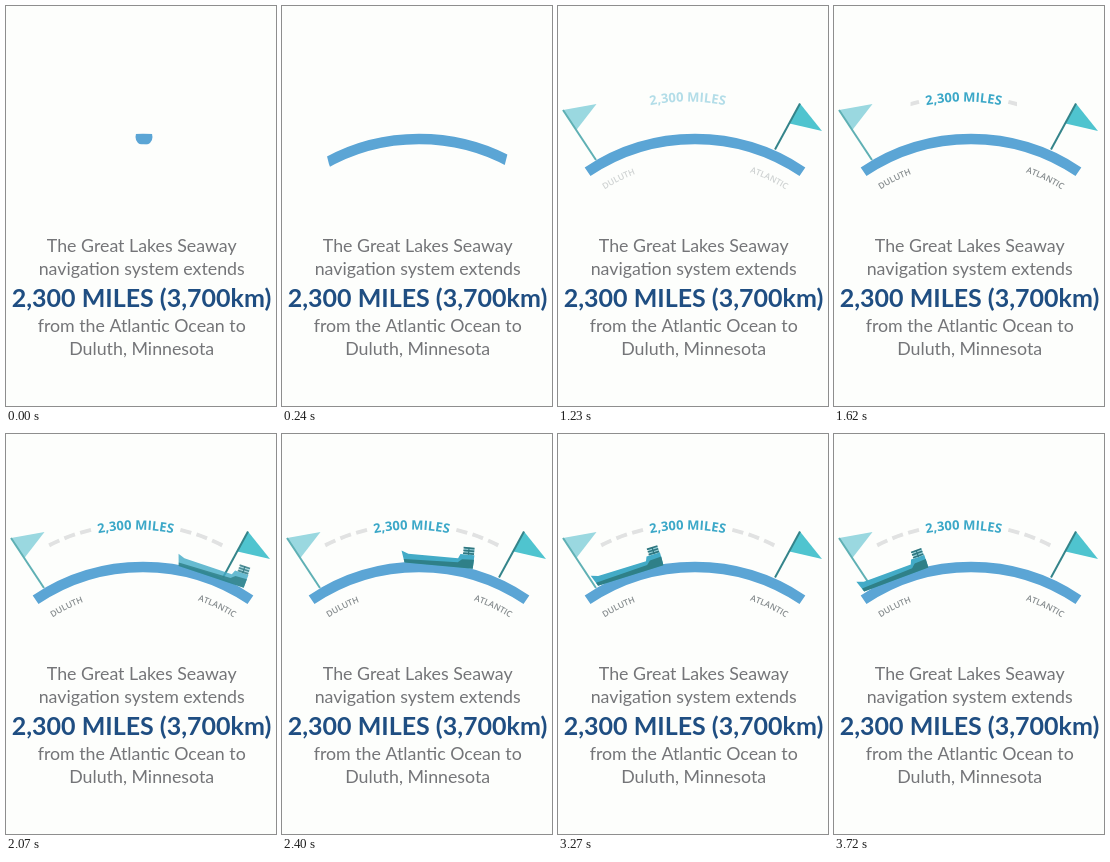
These frames come from a looping animation (270 by 400 pixels, 3750 ms). An HTML page with a canvas:

```html
<!DOCTYPE html>
<html lang="en">
<head>
<meta charset="utf-8">
<title>Seaway</title>
<style>
html, body { margin: 0; width: 100%; height: 100%; overflow: hidden; background: #fdfefc; }
canvas { display: block; width: 270px; height: 400px; }
</style>
</head>
<body>
<canvas id="stage"></canvas>
<script>
const LOOP = 3750, STEP = 30;
const W = 270, H = 400;
const canvas = document.getElementById('stage');
const ctx = canvas.getContext('2d');
const dpr = window.devicePixelRatio || 1;
canvas.width = W * dpr;
canvas.height = H * dpr;

const RAD = Math.PI / 180;
const river = { x: 137, y: 325.6, r: 192.6 };
const route = { x: 129.7, y: 280.5, r: 190 };

const progress = (t, start, length) => Math.min(1, Math.max(0, (t - start) / length));
const easeOut = (p, power) => 1 - Math.pow(1 - p, power);

function polygon(color, points) {
  ctx.fillStyle = color;
  ctx.beginPath();
  points.forEach(([x, y]) => ctx.lineTo(x, y));
  ctx.closePath();
  ctx.fill();
}

// Angles are in degrees, clockwise from straight up.
function strokeArc(circle, from, to, width, color) {
  ctx.strokeStyle = color;
  ctx.lineWidth = width;
  ctx.beginPath();
  ctx.arc(circle.x, circle.y, circle.r, (from - 90) * RAD, (to - 90) * RAD);
  ctx.stroke();
}

function arcText(text, circle, radius, middle, font, color) {
  ctx.font = font;
  ctx.fillStyle = color;
  ctx.textAlign = 'center';
  const total = ctx.measureText(text).width;
  let offset = -total / 2;
  for (const letter of text) {
    const width = ctx.measureText(letter).width;
    ctx.save();
    ctx.translate(circle.x, circle.y);
    ctx.rotate(middle * RAD + (offset + width / 2) / radius);
    ctx.fillText(letter, 0, -radius);
    ctx.restore();
    offset += width;
  }
}

function drawCaption() {
  const lines = [
    ['The Great Lakes Seaway', 246],
    ['navigation system extends', 269],
    ['from the Atlantic Ocean to', 326],
    ['Duluth, Minnesota', 349]
  ];
  ctx.textAlign = 'center';
  ctx.font = '400 17.8px Lato, sans-serif';
  ctx.fillStyle = '#747578';
  lines.forEach(([text, y]) => ctx.fillText(text, 135.7, y));
  ctx.font = '700 25px Lato, sans-serif';
  ctx.fillStyle = '#1f4e82';
  ctx.fillText('2,300 MILES (3,700km)', 135.5, 300.5);
}

function drawRiver(t) {
  const p = easeOut(progress(t, 0, 540), 2.4);
  ctx.save();
  if (p < 1) {
    ctx.beginPath();
    ctx.arc(138 - 4 * p, 131, 8.5 + 110.5 * p, 0, 2 * Math.PI);
    ctx.clip();
  }
  strokeArc(river, -33.9, 33.9, 10.4, '#5ba5d5');
  ctx.restore();
}

function drawFlag(scale, base, top, tip, fold, poleColor, flagColor) {
  if (scale <= 0) return;
  ctx.save();
  ctx.translate(...base);
  ctx.scale(scale, scale);
  polygon(flagColor, [top, tip, fold]);
  ctx.strokeStyle = poleColor;
  ctx.lineWidth = 2;
  ctx.beginPath();
  ctx.moveTo(0, 0);
  ctx.lineTo(...top);
  ctx.stroke();
  ctx.restore();
}

function drawFlags(t) {
  const left = easeOut(progress(t, 540, 540), 2.15);
  const right = easeOut(progress(t, 540, 540), 2);
  drawFlag(left, [38, 154], [-33, -50], [0.5, -56], [-20, -29.5], '#5fb0b4', '#9ad8e0');
  drawFlag(right, [217, 143.5], [25, -46], [47, -18.5], [14.5, -26], '#34848a', '#4fc4cf');
}

function drawLabels(t) {
  ctx.globalAlpha = progress(t, 1080, 390);
  const small = '600 8.5px "Open Sans", sans-serif';
  arcText('2,300 MILES', route, 185, 0, '700 13px "Open Sans", sans-serif', '#3ca8c8');
  arcText('DULUTH', river, 168.5, -26.6, small, '#868c8e');
  arcText('ATLANTIC', river, 168.5, 25.7, small, '#868c8e');
  ctx.globalAlpha = 1;
}

function drawDashes(t) {
  const shown = 45 * easeOut(progress(t, 1590, 420), 3);
  if (shown <= 0) return;
  ctx.save();
  ctx.beginPath();
  ctx.rect(85.5 - shown, 80, 88.5 + 2 * shown, 40);
  ctx.clip();
  for (let i = 0; i < 3; i++) {
    const near = 13.6 + i * 5.05;
    strokeArc(route, near, near + 3.4, 4, '#e1e2e2');
    strokeArc(route, -near - 3.4, -near, 4, '#e1e2e2');
  }
  ctx.restore();
}

function drawShip(t) {
  const alpha = progress(t, 1950, 150);
  if (alpha <= 0) return;
  const rest = 3720 - Math.min(3720, Math.max(2093, t));
  const angle = -22.6 + 1.624e-5 * rest * rest;
  ctx.save();
  ctx.globalAlpha = alpha;
  ctx.translate(river.x + 195 * Math.sin(angle * RAD), river.y - 195 * Math.cos(angle * RAD));
  ctx.rotate(angle * 0.9 * RAD);

  polygon('#43abc7', [[-38, -11.7], [-31, -9.2], [19, -9], [21, -13.5], [35, -13.5], [34.5, 0], [-34, 0]]);
  polygon('#2f8088', [[-35, -3.5], [19, -5], [23, -8.5], [35, -9], [34.5, 0], [-34, 0]]);

  ctx.fillStyle = '#9bd3dc';
  ctx.fillRect(24.5, -20.5, 10, 7);
  ctx.fillStyle = '#2f7780';
  for (let row = 0; row < 3; row++) {
    ctx.fillRect(23.5, -21 + row * 2.8, 11, 1.7);
  }
  ctx.fillRect(28.4, -20.5, 1.2, 7);
  ctx.restore();
}

function draw(t) {
  ctx.setTransform(dpr, 0, 0, dpr, 0, 0);
  ctx.fillStyle = '#fdfefc';
  ctx.fillRect(0, 0, W, H);
  drawCaption();
  drawFlags(t);
  drawRiver(t);
  drawLabels(t);
  drawDashes(t);
  drawShip(t);
}

const startTime = performance.now();
function tick() {
  const elapsed = (performance.now() - startTime) % LOOP;
  draw(Math.floor(elapsed / STEP) * STEP);
  requestAnimationFrame(tick);
}
tick();
</script>
</body>
</html>
```
